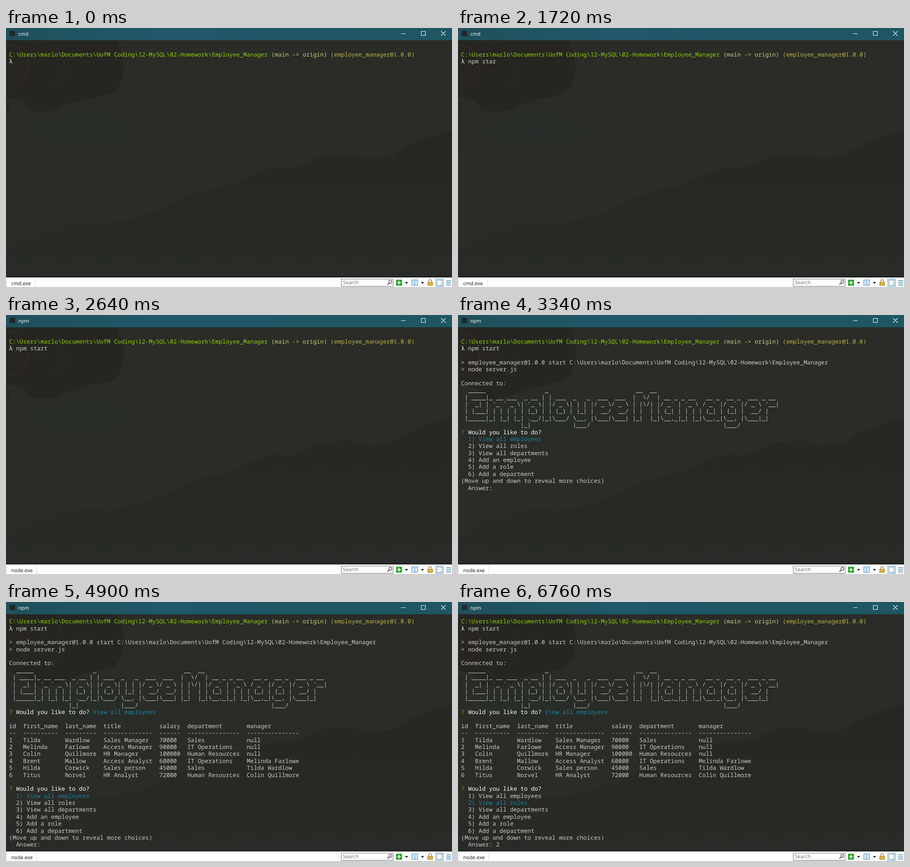
An HTML page that plays this animation: 981 by 571 pixels, repeating every 8000 ms.

```html
<!DOCTYPE html>
<html lang="en">
<head>
<meta charset="utf-8">
<title>Terminal session</title>
<style>
  html, body { margin: 0; width: 100%; height: 100%; overflow: hidden; background: #2b2b27; }
  svg { display: block; width: 100%; height: 100%; }
  text { white-space: pre; text-rendering: geometricPrecision; }
  #screen { font: 12.82px "Noto Sans Mono", "DejaVu Sans Mono", monospace; fill: #cacaca; }
  .ui { font: 11.1px "Open Sans", "Noto Sans", sans-serif; }
  .path { fill: #8dd006; }
  .branch { fill: #cccc81; }
  .package { fill: #b6b649; }
  .first-mark { fill: #8a7a1c; }
  .mark { fill: #74aa04; }
  .active { fill: #1a83a6; }
  .bright { fill: #fff; }
</style>
</head>
<body>
<svg viewBox="0 0 981 571">
  <defs>
    <linearGradient id="bar">
      <stop stop-color="#1f505b"/><stop offset=".35" stop-color="#20586a"/><stop offset="1" stop-color="#1e5663"/>
    </linearGradient>
    <linearGradient id="hill" x2="0" y2="1">
      <stop stop-color="#262722"/><stop offset=".5" stop-color="#272924"/><stop offset="1" stop-color="#282b27"/>
    </linearGradient>
    <radialGradient id="haze">
      <stop stop-color="#272d28"/><stop offset="1" stop-color="#272d28" stop-opacity="0"/>
    </radialGradient>
  </defs>

  <!-- wallpaper behind the console -->
  <rect width="981" height="571" fill="#2b2b27"/>
  <ellipse cx="170" cy="225" rx="250" ry="70" fill="url(#haze)"/>
  <ellipse cx="600" cy="150" rx="330" ry="90" fill="url(#haze)" opacity=".4"/>
  <path fill="url(#hill)" d="M0 497 30 471 55 456 100 453 122 437 160 428 230 430 290 418 350 395 400 370 440 357 490 348 530 329 570 312 600 306 622 311 660 298 690 281 760 277 800 289 850 281 880 262 920 245 981 226V549H0Z"/>
  <path fill="#262521" d="M0 27H243Q262 60 258 98T230 145Q204 152 190 154T130 171Q116 184 80 185T48 168Q24 152 0 153Z"/>
  <path fill="#272621" d="M0 163Q10 168 9 178L0 188Z"/>
  <g fill="none" stroke="#2d2722">
    <circle cx="0" cy="85" r="22" stroke-width="3"/>
    <circle cx="0" cy="85" r="48" stroke-width="5"/>
    <path d="M113 45Q130 70 128 100T107 128" stroke="#2b2a26" stroke-width="2"/>
  </g>

  <!-- title bar -->
  <rect width="981" height="27" fill="url(#bar)"/>
  <rect x="8" y="6" width="12" height="12" rx="1" fill="#20292c"/>
  <text id="title" class="ui" x="27" y="17" fill="#fff"/>
  <path d="M869 12.5h10M913.5 7.5h9v9h-9zM957 7l10 10m0-10-10 10" fill="none" stroke="#fff" stroke-width="1.1"/>

  <g id="screen"></g>

  <!-- status bar -->
  <rect y="547" width="981" height="3" fill="#242421"/>
  <rect y="550" width="981" height="21" fill="#fcfdfe"/>
  <path id="tab" fill="#fff" stroke="#d4d8dc"/>
  <text id="task" class="ui" x="11.5" y="567" fill="#111"/>
  <rect x="737.5" y="553.5" width="114" height="16" fill="#fff" stroke="#6f6f6f"/>
  <text class="ui" x="741" y="565" fill="#6b6b6b" font-style="italic">Search</text>
  <g fill="none" stroke="#555" stroke-width="1.4">
    <circle cx="845.5" cy="559.5" r="3.2"/><path d="M843 562l-4 4" stroke-width="2"/>
  </g>
  <rect x="858" y="555" width="13" height="13" fill="#25a32b"/>
  <path d="M864.5 557.5v8M860.5 561.5h8" stroke="#fff" stroke-width="2.2"/>
  <path d="M877.5 560h7l-3.5 4zM912.5 560h7l-3.5 4z" fill="#222"/>
  <rect x="892.5" y="555.5" width="13" height="12" fill="#d3e8f8" stroke="#4c8fc0"/>
  <path d="M897 559l2-1v7m-2 0h4" fill="none" stroke="#6da5d0"/>
  <path d="M930 561v-3q0-3 3-3t3 3v3" fill="none" stroke="#a58a3c" stroke-width="1.5"/>
  <rect x="927.5" y="560.5" width="11" height="7" fill="#d6b244" stroke="#a98a2c"/>
  <rect x="944.5" y="552.5" width="18" height="18" fill="#cfe7f9" stroke="#8fc2e8"/>
  <rect x="948" y="555.5" width="12" height="12" fill="#fff" stroke="#6c8796"/>
  <path d="M957 556v11" stroke="#7e98a7" stroke-dasharray="2 1"/>
  <path d="M968 557.5h11M968 562h11M968 566.5h11" stroke="#2f7fa8" stroke-width="1.7"/>
</svg>

<script>
const LOOP = 8000;
const CELL = { x: 6.8, baseline: 47.2, height: 15.38 };
const AT = { title: 2330, task: 2640, launch: 2870, menu: 3340, table: 4900, redraw: 6690, answer: 6760 };
const KEYS = [[560, 'n'], [710, 'p'], [940, 'm'], [1320, ' s'], [1490, 't'], [1640, 'a'], [1720, 'r'], [1950, 't']];

const el = id => document.getElementById(id);
const tint = (name, text) => `<tspan class="${name}">${text}</tspan>`;

const folder = String.raw`C:\Users\marlo\Documents\UofM Coding\12-MySQL\02-Homework\Employee_Manager`;
const prompt = [tint('path', folder), tint('branch', '(main -> origin)'), tint('package', '(employee_manager@1.0.0)')].join(' ');
const launch = ['', `> employee_manager@1.0.0 start ${folder}`, '> node server.js'];

const banner = String.raw`
  _____                 _                         __  __
 | ____|_ __ ___  _ __ | | ___  _   _  ___  ___  |  \/  | __ _ _ __   __ _  __ _  ___ _ __
 |  _| | '_ ~ _ \| '_ \| |/ _ \| | | |/ _ \/ _ \ | |\/| |/ _~ | '_ \ / _~ |/ _~ |/ _ \ '__|
 | |___| | | | | | |_) | | (_) | |_| |  __/  __/ | |  | | (_| | | | | (_| | (_| |  __/ |
 |_____|_| |_| |_| .__/|_|\___/ \__, |\___|\___| |_|  |_|\__,_|_| |_|\__,_|\__, |\___|_|
                 |_|            |___/                                      |___/`
  .replaceAll('~', '`').split('\n').slice(1);

const widths = [2, 10, 9, 14, 6, 15, 15];
const tableRow = cells => cells.map((cell, i) => cell.padEnd(widths[i])).join('  ');
const table = [
  'id,first_name,last_name,title,salary,department,manager',
  widths.map(n => '-'.repeat(n)).join(),
  '1,Tilda,Wardlow,Sales Manager,70000,Sales,null',
  '2,Melinda,Farlowe,Access Manager,90000,IT Operations,null',
  '3,Colin,Quillmore,HR Manager,100000,Human Resources,null',
  '4,Brent,Mallow,Access Analyst,60000,IT Operations,Melinda Farlowe',
  '5,Hilda,Corwick,Sales person,45000,Sales,Tilda Wardlow',
  '6,Titus,Norvel,HR Analyst,72000,Human Resources,Colin Quillmore'
].map(line => tableRow(line.split(',')));

const choices = ['View all employees', 'View all roles', 'View all departments', 'Add an employee', 'Add a role', 'Add a department'];
const question = mark => tint(mark, '?') + tint('bright', ' Would you like to do?');

function menu(mark, selected, answer = '') {
  const items = choices.map((choice, i) => {
    const item = `  ${i + 1}) ${choice}`;
    return i + 1 === selected ? tint('active', item) : item;
  });
  return [question(mark), ...items, '(Move up and down to reveal more choices)', `  Answer: ${answer}`];
}

function screenLines(t) {
  const typed = KEYS.filter(([time]) => t >= time).map(([, key]) => key).join('');
  const lines = [prompt, `${tint('bright', 'λ')} ${typed}`];
  if (t < AT.table) lines.unshift('');
  if (t >= AT.launch) lines.push(...launch);
  if (t >= AT.menu) lines.push('', 'Connected to:', ...banner);
  if (t >= AT.table) {
    lines.push(`${question('mark')} ${tint('active', choices[0])}`, '', ...table, '');
    if (t >= AT.answer) lines.push(...menu('mark', 2, '2'));
    else lines.push(...menu('mark', 1).slice(0, t >= AT.redraw ? 2 : undefined));
  } else if (t >= AT.menu) {
    lines.push(...menu('first-mark', 1));
  }
  return lines;
}

let shown;
function draw() {
  const t = performance.now() % LOOP;
  const markup = screenLines(t).map((line, row) =>
    `<text x="${CELL.x}" y="${CELL.baseline + row * CELL.height}">${line}</text>`).join('');
  if (markup !== shown) el('screen').innerHTML = shown = markup;

  const running = t >= AT.task;
  el('title').textContent = t >= AT.title ? 'npm' : 'cmd';
  el('task').textContent = running ? 'node.exe' : 'cmd.exe';
  el('tab').setAttribute('d', `M1.5 572V552.5H${running ? 67.5 : 64.5}V572`);
  requestAnimationFrame(draw);
}
draw();
</script>
</body>
</html>
```
